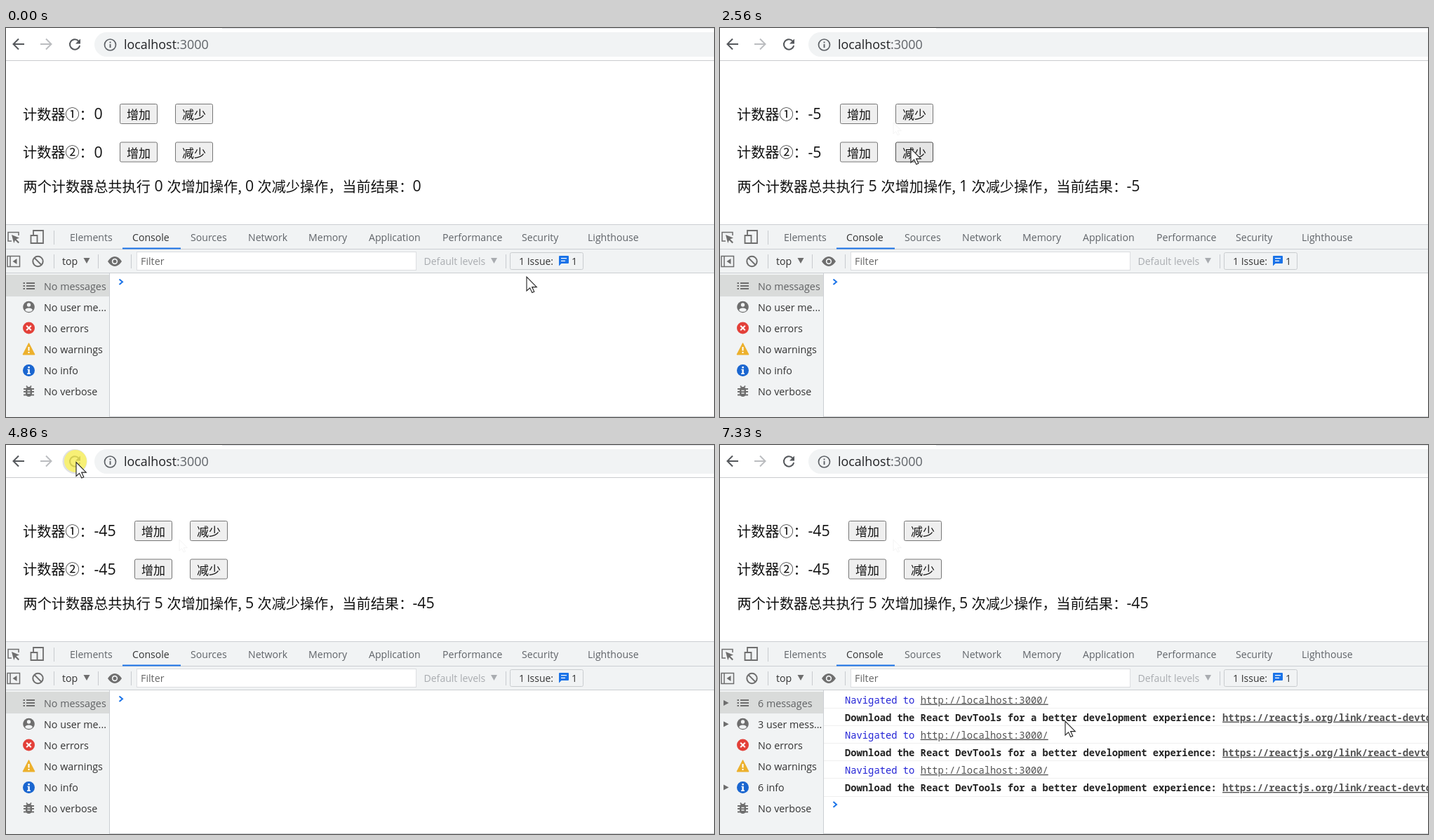
An HTML page for the animation above (8190 ms loop, 1009 by 555 pixels).

```html
<!DOCTYPE html>
<html lang="zh-CN">
<head>
<meta charset="utf-8">
<title>Counters</title>
<style>
html, body { margin: 0; width: 100%; height: 100%; overflow: hidden; background: #fff; }
svg { display: block; width: 1009px; height: 555px; }
text { white-space: pre; font-family: "Open Sans", "Noto Sans", sans-serif; }
.cjk { font-family: "Noto Sans CJK SC", "Noto Sans CJK", sans-serif; }
.mono { font-family: "Noto Sans Mono", "DejaVu Sans Mono", monospace; font-size: 13.81px; }
.link { fill: #545454; text-decoration: underline; }
.ico { fill: none; stroke: #6e6e6e; stroke-width: 1.8; }
</style>
</head>
<body>
<svg id="stage" viewBox="0 0 1009 555"></svg>
<script>
const LOOP = 8190;

// pointer trips: start, steps, from, control, to
const TRIPS = [
  [70, 8, 742, 355, 400, 165, 195, 125],
  [2220, 3, 195, 125, 238, 145, 272, 172],
  [4080, 11, 272, 172, 190, 95, 100, 24.5],
  [6840, 8, 100, 24.5, 260, 190, 492, 394]
];
const STEP = 69;

// press and release times
const ADD = [[690, 760], [890, 1030], [1230, 1300], [1500, 1630], [1830, 1960]];
const SUB = [[2490, 2560], [2690, 2760], [2890, 3020], [3150, 3350], [3550, 3700]];
const RELOAD = [[4860, 4930], [5610, 5680], [6360, 6500]];
const NAV = [5000, 5750, 6500];
const LOG = [5210, 5880, 6630];
const STATUS = [5140, 5750];

const text = (x, y, s, size, fill, more = "") =>
  `<text x="${x}" y="${y}" font-size="${size}" fill="${fill}" ${more}>${s}</text>`;
const cjk = (x, y, s, size = 20.15, fill = "#111") => text(x, y, s, size, fill, 'class="cjk"');
const num = (x, y, id) => text(x, y, "0", 21.3, "#111", `id="${id}"`);
const rect = (x, y, w, h, fill, more = "") =>
  `<rect x="${x}" y="${y}" width="${w}" height="${h}" fill="${fill}" ${more}/>`;
const path = (d, more = 'class="ico"') => `<path d="${d}" ${more}/>`;
const circle = (x, y, r, more) => `<circle cx="${x}" cy="${y}" r="${r}" ${more}/>`;
const fill = c => `fill="${c}"`;

const button = (x, y, label, id) =>
  rect(x + .5, y + .5, 53, 28, "#efefef", `rx="2" stroke="#767676" id="${id}"`) +
  cjk(x + 10, y + 22, label, 17);

function toolbar() {
  const stroke = c => `fill="none" stroke="${c}" stroke-width="2"`;
  return rect(308, 0, 701, 1, "#dfe1e5") +
    rect(126, 6, 920, 35, "#f1f3f4", 'rx="17.5"') +
    rect(0, 46, 1009, 1, "#c9cbce") +
    path("M26 23H11M18 15.5L10.5 23L18 30.5", stroke("#55585c")) +
    path("M49 23H64M57 15.5L64.5 23L57 30.5", stroke("#bbbdc0")) +
    circle(98, 23.5, 17.5, 'fill="#dfe1e3" id="hover"') +
    path("M103.5 18.6A7.2 7.2 0 1 0 105.2 25", stroke("#55585c")) +
    path("M106 15.5V22.5H99Z", fill("#55585c")) +
    circle(148.5, 24, 8, 'fill="none" stroke="#5f6368" stroke-width="1.7"') +
    rect(147.6, 23, 1.9, 5.2, "#5f6368") + rect(147.6, 19.5, 1.9, 2, "#5f6368") +
    text(168, 30, 'localhost<tspan fill="#5f6368">:3000</tspan>', 17.9, "#202124");
}

function page() {
  const row = (y, mark, i) => cjk(24, y + 22.5, `计数器${mark}：`) + num(125.5, y + 22, "count" + i) +
    `<g class="pair">${button(162, y, "增加", "add" + i)}${button(241, y, "减少", "sub" + i)}</g>`;
  return row(108, "①", 1) + row(162.5, "②", 2) +
    cjk(24.5, 233.5, "两个计数器总共执行") + num(211.5, 233, "adds") +
    cjk(229.5, 233.5, "次增加操作,") + num(341, 233, "subs") +
    cjk(358.5, 233.5, "次减少操作，当前结果：") + num(579.5, 233, "total") +
    `<g id="status">${path("M0 252H610Q614 252 614 256V280H0Z", fill("#e1e3e7"))}` +
    cjk(-5, 274, "正在连接...", 15.5, "#6b6f74") + "</g>";
}

function devtools() {
  const tabs = [[91, "Elements"], [180, "Console"], [263, "Sources"], [345, "Network"], [431, "Memory"],
    [517, "Application"], [622, "Performance"], [735, "Security"], [829, "Lighthouse"]];
  const bar = (x, y) => rect(x, y, 1, 20, "#c8cbcf");
  return rect(0, 280, 1009, 70, "#f1f3f4") +
    [280, 315, 349].map(y => rect(0, y, 1009, 1, "#cbced2")).join("") +
    tabs.map(([x, s]) => text(x, 304, s, 14.1, s === "Console" ? "#333" : "#5f6368")).join("") +
    rect(166, 313.5, 83, 2, "#1a73e8") +
    path("M8 304H3V291.5H18V296", 'class="ico" style="stroke-width:1.5"') +
    path("M8 295L19 299.5L14.5 301.2L19 305.8L17.4 307.3L13 302.7L11.2 307Z", fill("#6e6e6e")) +
    path("M39 295V289H53V307H45M35.5 296H44.5V307H35.5Z") +
    bar(68, 289) + bar(68, 323) + bar(131, 323) + bar(178, 323) +
    path("M2 325.5H19.5V340.5H2ZM6 325.5V340.5", 'class="ico" style="stroke-width:1.5"') +
    path("M15.5 329V337L9.5 333Z", fill("#6e6e6e")) +
    circle(45.5, 333, 7.2, 'class="ico" style="stroke-width:2"') + path("M40.5 328L50.5 338") +
    text(80, 338, "top", 14.2, "#333") + path("M110.5 328H119.5L115 336Z", fill("#6e6e6e")) +
    path("M145 333Q149.5 326 155 326T165 333Q160.5 340 155 340T145 333Z", fill("#6e6e6e")) +
    circle(155, 333, 4.2, fill("#f1f3f4")) + circle(155, 333, 2.5, fill("#6e6e6e")) +
    rect(186.5, 319.5, 398, 26, "#fff", 'stroke="#dcdee1" id="filter"') +
    text(192, 338, "Filter", 14.3, "#666") +
    `<g id="levels">${text(595.5, 338, "Default levels", 14.05, "#a9acb0")}` +
    path("M691 328H700L695.5 336Z", fill("#a9acb0")) + bar(712, 323) + "</g>" +
    rect(718.5, 320.5, 104, 24, "#f1f3f4", 'rx="2" stroke="#c9cccf" id="issueBox"') +
    text(731, 338, "1 Issue:", 14, "#333", 'id="issueText"') +
    `<g id="issueIcon">${path("M789 325H801Q802 325 802 326V335Q802 336 801 336H791.5L788 339.5V326Q788 325 789 325Z", fill("#1a73e8"))}` +
    path("M791 328.7H799M791 332.3H797", 'stroke="#fff" stroke-width="1.3"') +
    text(806, 338, "1", 14, "#333") + "</g>";
}

function sidebar() {
  const g = "#6e6e6e";
  const labels = ["No messages", "No user me...", "No errors", "No warnings", "No info", "No verbose"];
  const y = i => 368 + i * 30.15;
  return rect(0, 350, 147, 205, "#f1f3f4") + rect(147, 350, 1, 205, "#cbced2") +
    rect(0, 352, 147, 31, "#d9dbda") +
    labels.map((s, i) => text(54, y(i) + 5.5, s, 14.3, i ? "#333" : "#606264", `id="side${i}"`)).join("") +
    path("M29 364H41M29 368H41M29 372H41", 'class="ico"') +
    path("M24.5 364H27M24.5 368H27M24.5 372H27") +
    circle(32.5, 398, 8.3, fill(g)) + circle(32.5, 395, 2.7, fill("#f1f3f4")) +
    path("M27 402.5Q28 399.5 32.5 399.5T38 402.5Q36 405 32.5 405T27 402.5Z", fill("#f1f3f4")) +
    circle(32.5, 428, 8.5, fill("#e34039")) +
    path("M29.2 424.7L35.8 431.3M35.8 424.7L29.2 431.3", 'stroke="#fff" stroke-width="2"') +
    path("M32.5 449.5L41 466H24Z", 'fill="#ecb02c" stroke="#ecb02c" stroke-linejoin="round"') +
    rect(31.5, 455, 2, 5.5, "#fff") + rect(31.5, 462, 2, 2, "#fff") +
    circle(32.5, 488.5, 8.5, fill("#1a66d0")) +
    rect(31.4, 483, 2.4, 2.4, "#fff") + path("M30.5 486.7H33.8V492.5H35V494H30V492.5H31.4V488H30.5Z", fill("#fff")) +
    rect(28, 512, 9, 14, g, 'rx="4.5"') +
    path("M25 515H40M25 519H40M25 523.5H40M29 510.5L31 513M36 510.5L34 513", 'class="ico"') +
    path("M30.5 517.5H34.5M30.5 521H34.5", 'stroke="#f1f3f4" stroke-width="1.3"') +
    '<g id="arrows">' + [0, 1, 4].map(i => path(`M5 ${y(i) - 4}V${y(i) + 4}L12.5 ${y(i)}Z`, fill(g))).join("") + "</g>";
}

function messages() {
  const nav = 'Navigated to <tspan class="link">http://localhost:3000/</tspan>';
  const log = 'Download the React DevTools for a better development experience: ' +
    '<tspan class="link">https://reactjs.org/link/react-devtools</tspan>';
  let out = "";
  for (let i = 0; i < 6; i++) {
    const y = 368.5 + i * 25.1;
    out += `<g class="line"><text x="178" y="${y}" class="mono" ` +
      (i % 2 ? 'font-weight="700" fill="#222">' + log : 'fill="#2424d6">' + nav) + "</text>" +
      rect(148, Math.round(y + 6.5), 861, 1, "#efefef") + "</g>";
  }
  return out + path("M161.5 358.5L166 362.3L161.5 366.1", 'fill="none" stroke="#1a73e8" stroke-width="2" id="prompt"') +
    rect(0, 554, 1009, 1, "#cfd1d4");
}

const arrow = more => path("M0 0V20L4.6 15.8L7.8 22.6L10.8 21.2L7.7 14.6H14.3Z",
  `fill="#fff" stroke="#222" stroke-width="1.1" ${more}`);

const stage = document.getElementById("stage");
stage.innerHTML = rect(0, 0, 1009, 555, "#fff") + toolbar() + page() + devtools() + messages() + sidebar() +
  arrow('id="trace" transform="translate(247 135) scale(.8)" opacity=".05"') +
  circle(0, 0, 16, 'fill="#fff650" fill-opacity=".74" id="spot"') + arrow('id="pointer"');

const $ = id => document.getElementById(id);
const show = (el, on) => { el.style.display = on ? "" : "none"; };
const say = (id, s) => { if ($(id).textContent !== String(s)) $(id).textContent = s; };
const shift = (el, x, y = 0) => el.setAttribute("transform", `translate(${x} ${y})`);
const held = (list, t) => list.some(([a, b]) => t >= a && t < b);
const released = (list, t) => list.filter(p => t >= p[1]).length;
const passed = (list, t) => list.filter(a => t >= a).length;
const lines = [...document.querySelectorAll(".line")];
const pairs = [...document.querySelectorAll(".pair")];

function pointerAt(t) {
  const trip = TRIPS.filter(r => t >= r[0]).pop();
  if (!trip) return [742, 355];
  const [t0, n, x0, y0, cx, cy, x1, y1] = trip;
  const k = Math.min(1, (Math.floor((t - t0) / STEP) + 1) / n);
  const p = k * k * (3 - 2 * k), q = 1 - p;
  return [q * q * x0 + 2 * p * q * cx + p * p * x1, q * q * y0 + 2 * p * q * cy + p * p * y1];
}

function paintButton(id, over, down) {
  $(id).setAttribute("fill", down ? "#f6f6f6" : over ? "#e5e5e5" : "#efefef");
  $(id).setAttribute("stroke", down ? "#8d8d8d" : over ? "#4f4f4f" : "#767676");
}

function draw(t) {
  const [x, y] = pointerAt(t);
  shift($("pointer"), x, y);
  shift($("spot"), x - 1, y - 1.5);
  show($("spot"), held(ADD, t) || held(SUB, t) || held(RELOAD, t));
  show($("trace"), t >= 560);
  show($("hover"), Math.hypot(x - 98, y - 23) < 18);

  const adds = released(ADD, t), subs = released(SUB, t), value = adds - 10 * subs;
  for (const id of ["count1", "count2", "total"]) say(id, value);
  say("adds", adds);
  say("subs", subs);
  const dx = value < -9 ? 21 : value < 0 ? 9 : 0;
  pairs.forEach(p => shift(p, dx));
  paintButton("add1", x > 162 && x < 216 && y > 108 && y < 137, held(ADD, t));
  paintButton("sub2", x > 241 + dx && x < 295 + dx && y > 162 && y < 192, held(SUB, t));

  const navs = passed(NAV, t), logs = passed(LOG, t), count = navs + logs;
  lines.forEach((l, i) => show(l, i < count));
  shift($("prompt"), 0, count * 25.1);
  show($("arrows"), navs > 0);
  say("side0", navs ? navs * 2 + " messages" : "No messages");
  say("side1", navs ? navs + " user mess..." : "No user me...");
  say("side4", navs ? navs * 2 + " info" : "No info");
  show($("status"), t >= STATUS[0] && t < STATUS[1]);

  const none = navs > logs;
  say("issueText", none ? "No Issues" : "1 Issue:");
  $("issueText").setAttribute("x", none ? 728 : 731);
  $("issueBox").setAttribute("x", none ? 715.5 : 718.5);
  $("issueBox").setAttribute("width", none ? 119 : 104);
  $("filter").setAttribute("width", none ? 395 : 398);
  shift($("levels"), none ? -3 : 0);
  shift($("issueIcon"), none ? 11.5 : 0);
}

function tick() {
  draw(performance.now() % LOOP);
  requestAnimationFrame(tick);
}
tick();
</script>
</body>
</html>
```
